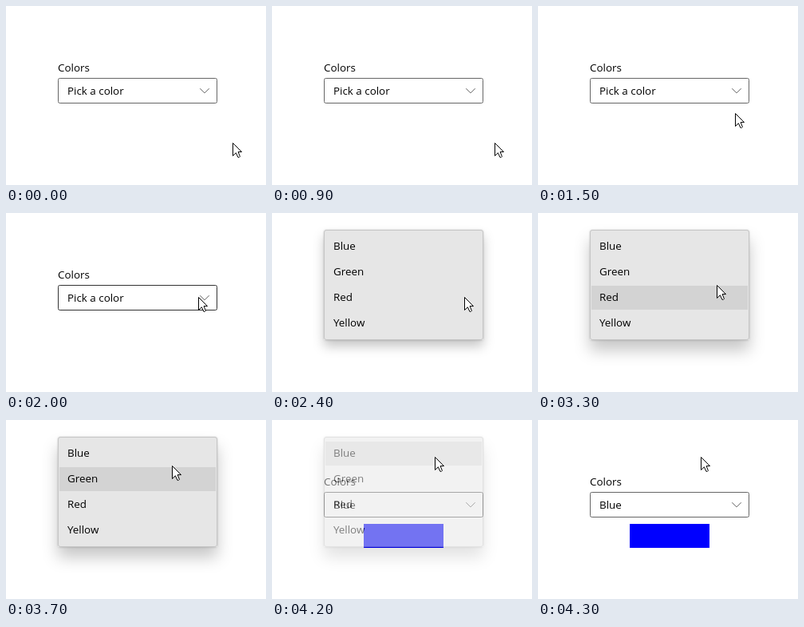
An HTML page for the animation above (6800 ms loop, 326 px wide and 224 px high).

```html
<!DOCTYPE html>
<html lang="en">
<head>
<meta charset="utf-8">
<title>Color picker</title>
<style>
  html, body { margin: 0; width: 100%; height: 100%; overflow: hidden; background: #fff; }
  svg { display: block; width: 326px; height: 224px; }
  text { font: 13.4px "Open Sans", "Noto Sans", sans-serif; fill: #000; }
</style>
</head>
<body>
<svg viewBox="0 0 326 224">
  <defs>
    <filter id="shadow" x="-30%" y="-30%" width="160%" height="180%">
      <feDropShadow id="soft" dx="0" flood-color="#000" flood-opacity=".22"/>
    </filter>
    <filter id="rim">
      <feDropShadow dx="0" dy=".3" stdDeviation=".8" flood-color="#000" flood-opacity=".2"/>
    </filter>
  </defs>
  <rect width="326" height="224" fill="#fff"/>

  <g id="field">
    <text x="65" y="82">Colors</text>
    <rect id="box" x="65.5" y="90.5" width="199" height="31" rx="2" fill="#fff"/>
    <text id="value" x="77" y="111"></text>
    <path d="M243.3 103.2 249 108.9 254.7 103.2" fill="none" stroke="#666" stroke-width="1"/>
    <rect id="swatch" x="115" y="130" width="100" height="30" fill="#00f"/>
  </g>

  <g id="popup">
    <rect x="65" y="21" width="200" height="138" rx="3" fill="#e6e6e6" filter="url(#shadow)"/>
    <rect x="65" y="21" width="200" height="138" rx="3" fill="#e6e6e6" filter="url(#rim)"/>
    <rect x="65.5" y="21.5" width="199" height="137" rx="2.5" fill="#e6e6e6" stroke="#c6c6c6"/>
    <rect id="hover" x="67" width="196" height="30" fill="#d3d3d3"/>
    <g id="items"></g>
  </g>

  <path id="cursor" d="M.5 .5V16.5L4.4 12.8 6.9 18.3 8.3 18.4 9.4 17.3 7.1 11.6H11.5Z" fill="#fff" stroke="#000" stroke-width="1"/>
</svg>
<script>
const LOOP = 6800, STEP = 100;
const OPEN = 2400, HOVER = 2900, CLOSING = 4200, CLOSED = 4300;
const ROW_TOP = 27, ROW_PITCH = 32, ROW_GAP = 2;
const COLORS = ["Blue", "Green", "Red", "Yellow"];

// Pointer path: time, x, y
const PATH = [
  [0, 284, 171], [800, 284, 171], [900, 279, 171], [1500, 247, 134],
  [2000, 241, 105], [3000, 241, 105], [3300, 224, 90],
  [3700, 208, 57], [4000, 204, 46], [LOOP, 204, 46]
];

const el = id => document.getElementById(id);
const set = (id, attrs) => {
  for (const [name, value] of Object.entries(attrs)) el(id).setAttribute(name, value);
};

COLORS.forEach((name, i) => {
  const item = document.createElementNS("http://www.w3.org/2000/svg", "text");
  item.setAttribute("x", 77);
  item.setAttribute("y", 46 + i * ROW_PITCH);
  item.textContent = name;
  el("items").append(item);
});

function pointerAt(t) {
  const i = PATH.findIndex(p => p[0] > t);
  const [t0, x0, y0] = PATH[i - 1], [t1, x1, y1] = PATH[i];
  const k = (t - t0) / (t1 - t0);
  return [Math.round(x0 + (x1 - x0) * k), Math.round(y0 + (y1 - y0) * k)];
}

function draw(time) {
  const t = Math.floor((time % LOOP) / STEP) * STEP;
  const [x, y] = pointerAt(t);
  const open = t >= OPEN && t < CLOSED;
  const raised = t >= HOVER;
  const picked = t >= CLOSING;

  set("cursor", { transform: `translate(${x} ${y})` });

  set("field", { visibility: !open || picked ? "visible" : "hidden" });
  set("box", { stroke: y >= 90 && y < 122 ? "#333" : "#666" });
  el("value").textContent = picked ? COLORS[0] : "Pick a color";
  set("swatch", { opacity: picked ? 1 : 0 });

  set("popup", { display: open ? "inline" : "none", opacity: picked ? 0.5 : 1 });
  set("soft", { dy: raised ? 13 : 8, stdDeviation: raised ? 9.5 : 7 });
  const row = Math.floor((y - ROW_TOP + ROW_GAP) / ROW_PITCH);
  set("hover", { y: ROW_TOP + row * ROW_PITCH, opacity: raised ? 1 : 0 });
}

const start = performance.now();
function tick() {
  draw(performance.now() - start);
  requestAnimationFrame(tick);
}
tick();
</script>
</body>
</html>
```
